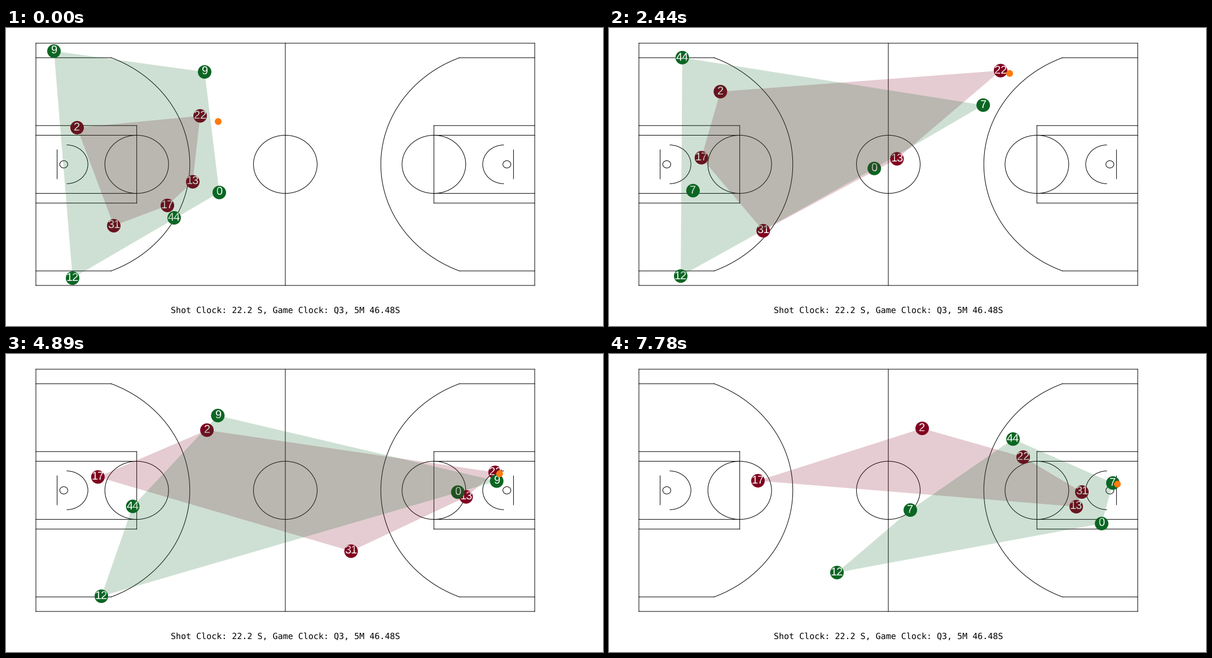
Animation, 1058 px wide and 529 px high, one loop 8 s. Source, as a matplotlib script:

```python
import numpy as np
import matplotlib.pyplot as plt
from matplotlib.animation import FuncAnimation
from matplotlib.patches import Arc, Circle, Polygon

W, H, DPI = 1058, 529, 64
LOOP, STEPS, INTERVAL = 8000, 36, 40
MAROON, GREEN, ORANGE = "#800020", "#0b6623", "#ff7a0c"

plt.rcParams["text.hinting"] = "none"


def px(size):
    return size * 72 / DPI


fig = plt.figure(figsize=(W / DPI, H / DPI), dpi=DPI, facecolor="white")
ax = fig.add_axes([0, 0, 1, 1])
ax.set_xlim(0, W)
ax.set_ylim(H, 0)
ax.axis("off")

# Court, measured in feet
X0, Y0 = 53, 27
FX, FY = 884 / 94, 430 / 50
INK = dict(color="black", lw=px(1), zorder=1, snap=False)


def line(x1, y1, x2, y2):
    ax.plot([X0 + x1 * FX, X0 + x2 * FX], [Y0 + y1 * FY, Y0 + y2 * FY],
            solid_capstyle="projecting", **INK)


def arc(x, r, start=0, end=360):
    ax.add_patch(Arc((X0 + x * FX, Y0 + 25 * FY), 2 * r * FX, 2 * r * FY,
                     theta1=start, theta2=end, **INK))


def three_point_line(side):
    a = np.arcsin(22 / 23.75)
    t = np.linspace(-a, a, 120)
    x = side(5.25 + 23.75 * np.cos(t))
    y = 25 + 23.75 * np.sin(t)
    ax.plot(X0 + x * FX, Y0 + y * FY, **INK)
    for corner in (3, 47):
        line(side(0), corner, side(14.2), corner)


def draw_half(mirror):
    def side(x):
        return 94 - x if mirror else x

    three_point_line(side)
    for half_width in (6, 8):
        for y in (25 - half_width, 25 + half_width):
            line(side(0), y, side(19), y)
    line(side(19), 17, side(19), 33)
    line(side(4), 22, side(4), 28)
    arc(side(19), 6)
    arc(side(5.25), 0.75)
    turn = 180 if mirror else 0
    arc(side(5.8), 4, turn - 90, turn + 90)


for edge in (0, 50):
    line(0, edge, 94, edge)
for edge in (0, 47, 94):
    line(edge, 0, edge, 50)
arc(47, 6)
draw_half(False)
draw_half(True)

ax.text(292, 505.5, "Shot Clock: 22.2 S, Game Clock: Q3, 5M 46.48S",
        family="DejaVu Sans Mono", size=px(15), color="black", va="baseline")


def ease(start, end):
    """Smooth rise from 0 to 1 between two steps, as a column."""
    u = np.clip((np.arange(STEPS) - start) / (end - start), 0, 1)
    return (u * u * (3 - 2 * u))[:, None]


def run(*points):
    """Monotone cubic through points evenly spaced over the loop."""
    p = np.array(points, float)
    d = np.diff(p, axis=0)
    before, after = d[:-1], d[1:]
    total = before + after
    bend = 2 * before * after / np.where(total == 0, 1, total)
    m = np.vstack([d[:1], np.where(before * after > 0, bend, 0), d[-1:]])
    s = np.linspace(0, len(d), STEPS)
    k = np.minimum(s.astype(int), len(d) - 1)
    u = (s - k)[:, None]
    rise = u * u * (3 - 2 * u)
    return (p[k] + rise * d[k] + u * (1 - u) ** 2 * m[k]
            - u * u * (1 - u) * m[k + 1])


class Player:
    def __init__(self, color, labels, track, z):
        self.labels, self.track = labels.split("/"), track
        self.dot = ax.add_patch(Circle((0, 0), 12, fc=color, ec="none", zorder=z))
        self.text = ax.text(0, 0, "", color="white", family="Liberation Sans",
                            size=px(20), ha="center", va="center", zorder=z + 0.05)

    def move(self, step, swapped):
        x, y = self.track[step]
        self.dot.center = (x, y)
        self.text.set_position((x, y))
        self.text.set_text(self.labels[-1 if swapped else 0])
        return x, y


class Team:
    def __init__(self, color, z, tracks):
        self.players = [Player(color, labels, track, z + i / 10)
                        for i, (labels, track) in enumerate(tracks.items())]
        self.area = ax.add_patch(Polygon(np.eye(3, 2), fc=color, ec="none",
                                         alpha=0.2, zorder=z + 2))

    def move(self, step, swapped):
        self.area.set_xy(hull([p.move(step, swapped) for p in self.players]))


def half_hull(points):
    out = []
    for x, y in points:
        while len(out) > 1:
            (px1, py1), (px2, py2) = out[-2:]
            if (px2 - px1) * (y - py1) > (py2 - py1) * (x - px1):
                break
            out.pop()
        out.append((x, y))
    return out[:-1]


def hull(points):
    points = sorted(points)
    return half_hull(points) + half_hull(points[::-1])


carrier = run((344, 156), (613, 53), (876, 199), (847, 214), (734, 183))
rebounder = run((352, 78), (580, 111), (868, 225), (871, 226), (893, 229))

teams = [
    Team(MAROON, 2, {
        "2": run((126, 177), (177, 112), (279, 122), (432, 144), (555, 132)),
        "22": carrier,
        "13": run((331, 273), (445, 229), (745, 251), (845, 256), (828, 271)),
        "17": run((286, 315), (173, 240), (150, 214), (187, 223), (264, 225)),
        "31": run((191, 351), (235, 357), (476, 368), (719, 319), (838, 245)),
    }),
    Team(GREEN, 3, {
        "9/44": run((85, 41), (107, 48), (268, 78), (486, 135), (716, 151)),
        "9/7": rebounder,
        "44/7": run((298, 337), (148, 293), (160, 280), (324, 265), (534, 277)),
        "12": run((118, 444), (128, 440), (178, 428), (404, 388)),
        "0": run((378, 292), (425, 256), (692, 237), (859, 260), (873, 301)),
    }),
]

# The ball leads its carrier, drifts back to him, then goes to the rebounder
lead = (1 - ease(0, 8) / 2 - ease(18, 26) / 2) * (32, 10)
ball_track = carrier + lead
ball_track += ease(26, 30) * (rebounder + (8, 2) - ball_track)
ball = ax.add_patch(Circle((0, 0), 6, fc=ORANGE, ec="none", zorder=7))


def update(n):
    step = min(int((n * INTERVAL + 32) * STEPS / LOOP), STEPS - 1)
    swapped = 11 <= step < 22 or step >= 29
    for team in teams:
        team.move(step, swapped)
    ball.center = tuple(ball_track[step])
    return []


anim = FuncAnimation(fig, update, frames=LOOP // INTERVAL, interval=INTERVAL,
                     init_func=lambda: update(0), repeat=True, repeat_delay=0,
                     blit=False)
plt.show()
```
